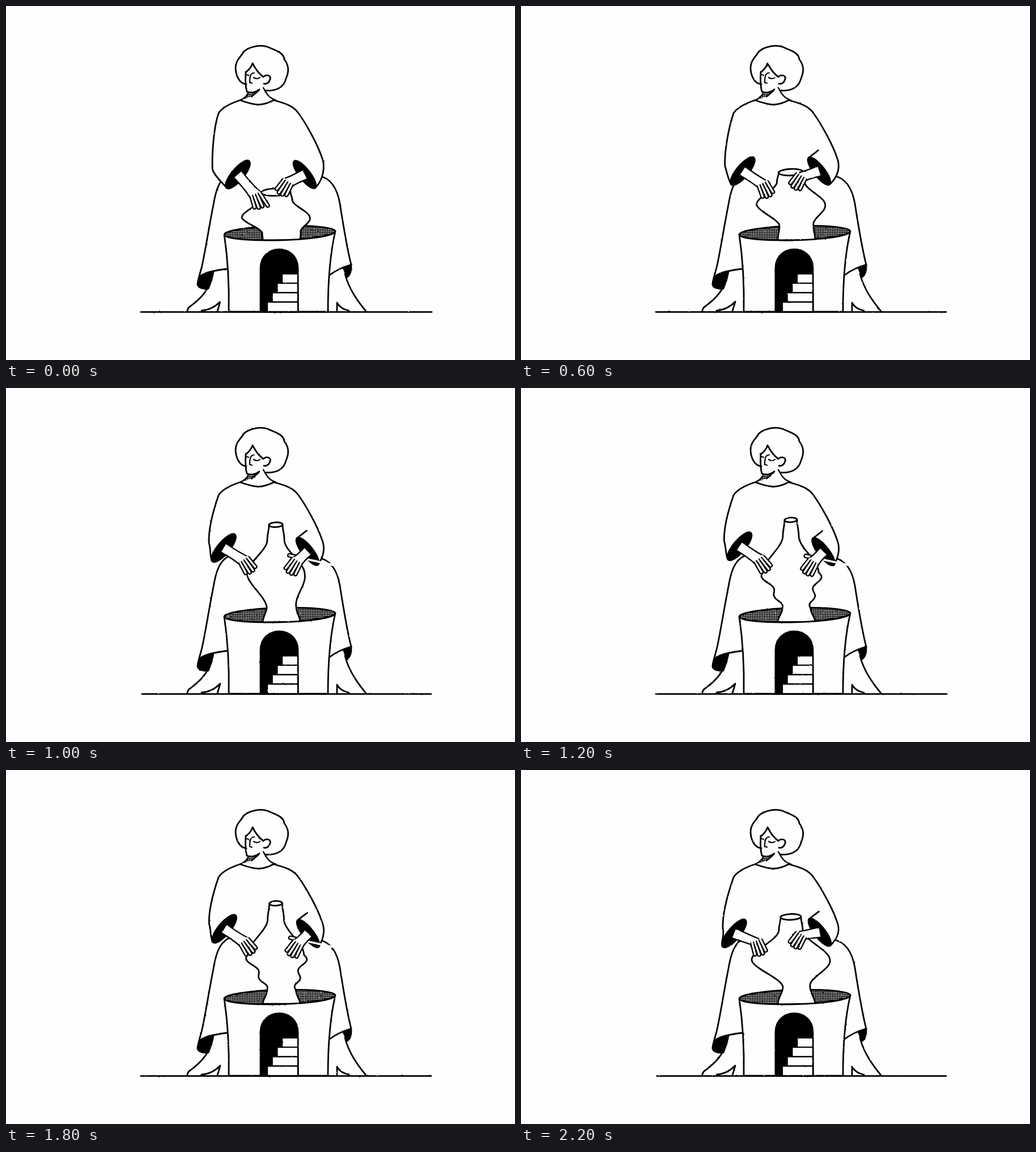
An HTML page with a canvas that plays this animation: 898x624 px, repeating every 2400 ms.

```html
<!DOCTYPE html>
<html lang="en">
<head>
<meta charset="utf-8">
<title>Potter</title>
<style>
html, body { margin: 0; width: 100%; height: 100%; overflow: hidden; background: #fefefe }
canvas { display: block; filter: url(#rough) }
svg { position: absolute; width: 0; height: 0 }
</style>
</head>
<body>
<canvas width="898" height="624"></canvas>
<svg><filter id="rough" x="0" y="0" width="100%" height="100%" color-interpolation-filters="sRGB">
  <feTurbulence type="fractalNoise" baseFrequency=".22" numOctaves="2" result="noise"/>
  <feDisplacementMap in="SourceGraphic" in2="noise" scale="1.8" xChannelSelector="R" yChannelSelector="G"/>
</filter></svg>
<script>
const ctx = document.querySelector('canvas').getContext('2d');
const noise = document.querySelector('feTurbulence');
const WHITE = '#fefefe', INK = '#000';

// cuffs: centres; hands: knuckles, left with finger angle in degrees;
// pot: height and half width of rim, bulge and waist
const POSES = [
  { cuffL: [409, 297], cuffR: [527, 297], handL: [441, 334, 68], handR: [496, 312], pot: [328, 26, 373, 60, 400, 34] },
  { cuffL: [406, 294], cuffR: [525, 296], handL: [439, 326, 60], handR: [494, 311], pot: [327, 25, 365, 52, 392, 36] },
  { cuffL: [376, 288], cuffR: [527, 286], handL: [416, 304, 70], handR: [493, 292], pot: [259, 18, 335, 69, 382, 24] },
  { cuffL: [384, 282], cuffR: [532, 288], handL: [421, 305, 57], handR: [512, 307], pot: [241, 12, 328, 51, 386, 26] },
  { cuffL: [387, 276], cuffR: [535, 289], handL: [422, 302, 52], handR: [517, 309], pot: [224, 10, 322, 47, 391, 24] }
];
// place between the poses at each step: up quickly, then settling back
const PHASES = [0, .5, 1, 1.5, 2, 3, 3.5, 4, 3.7, 3.35, 2.7, 2];

const clamp = v => Math.max(0, Math.min(1, v));
const mix = (a, b, k) => a.map((v, i) => v + (b[i] - v) * k);
const polar = (deg, r) => [r * Math.cos(deg * Math.PI / 180), r * Math.sin(deg * Math.PI / 180)];
const add = (a, b, k = 1) => [a[0] + b[0] * k, a[1] + b[1] * k];

function poseAt(phase) {
  const i = Math.min(3, Math.floor(phase)), pose = { phase };
  for (const key in POSES[0]) pose[key] = mix(POSES[i][key], POSES[i + 1][key], phase - i);
  return pose;
}

const tile = document.createElement('canvas');
tile.width = tile.height = 3;
const tc = tile.getContext('2d');
tc.fillRect(0, 0, 3, 3);
tc.fillStyle = WHITE;
tc.fillRect(1, 1, 1.7, 1.7);
const dots = ctx.createPattern(tile, 'repeat');

function draw(path, fill, line = 2.8, color = INK) {
  if (typeof path == 'string') path = new Path2D(path);
  if (fill) { ctx.fillStyle = fill; ctx.fill(path); }
  if (line) { ctx.strokeStyle = color; ctx.lineWidth = line; ctx.stroke(path); }
}

function ellipse(x, y, rx, ry, turn, fill) {
  const p = new Path2D();
  p.ellipse(x, y, rx, ry, turn, 0, 7);
  draw(p, fill);
}

function legs() {
  draw('M394 296C376 304 370 326 366 350C358 390 352 430 346 457C343 470 339 480 338 490');
  draw('M552 299C575 304 585 325 589 348C594 380 601 425 609 456');
  draw('M338 491C338 478 350 470 366 468C364 480 361 488 357 498C350 499 340 498 338 491Z', INK);
  draw('M343 476Q355 467 394 463M570 475Q585 463 609 456');
  draw('M595 461L609 456Q610 472 602 478Z', INK);
  draw('M363 482C354 506 340 518 327 528Q319 533 320 539M345 537Q365 535 378 521L373 538');
  draw('M598 472C605 500 622 522 635 538M584 538L584 523Q590 534 605 537');
}

function cloak({ cuffL, cuffR, phase }) {
  const spanL = polar(-50, 31), spanR = polar(52, 30);
  const low = add(cuffL, spanL, -1), end = add(cuffR, spanR), top = add(cuffR, spanR, -1);
  const elbow = [357 + (low[0] - 360) / 4, low[1] - 33];
  const line = new Path2D(`M${low}C${add(low, [-5, -8])} ${add(elbow, [4, 14])} ${elbow}` +
    `C${add(elbow, [-1, -25])} 366 215 375 189C382 178 398 171 413 166Q432 173 445 174Q460 173 472 166` +
    `C495 172 508 177 516 189C530 208 550 245 557 266C564 282 560 ${end[1] - 14} ${end}`);
  const area = new Path2D(line);
  area.lineTo(...top);
  area.lineTo(...add(cuffL, spanL));
  draw(area, WHITE, 0);
  draw(line);
  const fold = clamp(phase);
  if (fold) draw(`M${top}l${17 * fold} ${-13 * fold}`);
  ellipse(...cuffL, 31, 10.5, -50 * Math.PI / 180, INK);
  ellipse(...cuffR, 30, 9.5, 52 * Math.PI / 180, INK);
}

function head() {
  draw('M428 154Q440 152 446 149Q436 160 417 165Z', dots, 0);
  draw('M427 154Q423 162 413 166M446 149L433 160M454 144Q458 152 462 157Q467 163 476 166', null, 2.4);
  draw('M424 138C411 137 405 121 405 108C406 94 415 89 419 81C428 72 450 66 466 74' +
    'C478 79 490 83 491 94C501 107 498 118 494 128C490 144 476 150 459 149');
  draw('M423 117Q432 110 435 101Q443 117 454 125C459 120 468 122 466 129C464 135 460 138 455 137');
  draw('M423 116C422 130 423 144 425 151C432 154 441 152 447 147');
  draw('M438 118C432 118 430 122 430 135L434 136M437 126Q443 130 448 126M424 121L428 122', null, 2.2);
}

function pot({ pot: [rimY, rimW, bulgeY, bulgeW, waistY, waistW], phase }) {
  const ripple = 5 * clamp((phase - 3) * 3);
  const keys = [[rimY, rimW], [rimY + (bulgeY - rimY) * .3, rimW + 3], [bulgeY, bulgeW], [waistY, waistW], [413, 33]];
  const left = [], right = [];
  for (let y = rimY; y <= 413; y++) {
    const i = keys.findIndex(key => y < key[0]);
    const [y0, w0] = keys[i - 1] || keys[3], [y1, w1] = keys[i] || keys[4];
    const k = (y - y0) / (y1 - y0);
    let w = w0 + (w1 - w0) * k * k * (3 - 2 * k);
    if (i == 3) w += ripple * Math.sin(k * 11.4) * Math.min(1, 5 * (1 - k));
    const axis = 476 + 10 * clamp((y - bulgeY) / (waistY - bulgeY));
    left.push([axis - w, y]);
    right.unshift([axis + w, y]);
  }
  draw('M' + left.concat(right).join('L'), WHITE);
  ellipse(476, rimY, rimW, 2.3 + rimW * .16, -.04, WHITE);
}

function wheel(p) {
  ellipse(483, 400, 98, 12.5, -.03, dots);
  pot(p);
  draw('M385 403C392 450 394 490 393 539H568C568 490 571 440 581 397C578 415 390 419 385 403Z', WHITE);
  draw('M449 539V462C449 418 515 418 515 462V539Z', INK);
  for (let i = 0; i < 4; i++) draw(`M${487 - 8.7 * i} ${472 + 16.6 * i}H515V539H${487 - 8.7 * i}Z`, WHITE, 2.4);
}

// rounded limb, open at its root
function capsule(from, dir, length) {
  const tip = add(from, dir, length);
  draw(`M${from}L${tip}`, null, 8);
  draw(`M${add(from, dir, -4)}L${tip}`, null, 3.4, WHITE);
}

function hand(cuff, knuckle, angle, point) {
  const [dx, dy] = add(knuckle, cuff, -1), far = Math.hypot(dx, dy);
  const across = [dy / far, -dx / far], wrist = mix(cuff, knuckle, .6);
  const side = s => [add(cuff, across, 9 * s), add(wrist, across, 7.5 * s), add(knuckle, polar(angle - 90, 11 * s))];
  const [a, b, c] = side(1), [d, e, f] = side(-1);
  draw(`M${a}Q${b} ${c}L${f}Q${e} ${d}Z`, WHITE, 0);
  draw(`M${a}Q${b} ${c}M${d}Q${e} ${f}`, null, 2.4);
  for (let i = 0; i < 4; i++) {
    const s = i - 1.5, index = i == 3 ? point : 0;
    capsule(add(knuckle, polar(angle - 90, s * 5.4)), polar(angle - s * (4 + 3 * index), 1), 22 - s * s * 1.5 + 6 * index);
  }
}

function hands({ cuffL, cuffR, handL, handR, phase }) {
  const reach = clamp(phase - 2);
  if (reach) {
    const root = mix(cuffR, handR, .6);
    capsule(root, add(add(handR, [-12, -12]), root, -1), reach);
  }
  hand(cuffR, handR, 122, 0);
  hand(cuffL, handL, handL[2], clamp(1 - phase));
}

let shown = -1;
function frame() {
  const i = Math.floor(performance.now() / 200) % 12;
  if (i != shown) {
    shown = i;
    const pose = poseAt(PHASES[i]);
    noise.setAttribute('seed', i % 7 + 1);
    ctx.fillStyle = WHITE;
    ctx.fillRect(0, 0, 898, 624);
    ctx.lineCap = ctx.lineJoin = 'round';
    legs();
    cloak(pose);
    head();
    wheel(pose);
    hands(pose);
    draw(`M${239 + i % 3 - 1} 539.3H${751 - i % 2}`);
  }
  requestAnimationFrame(frame);
}
frame();
</script>
</body>
</html>
```
